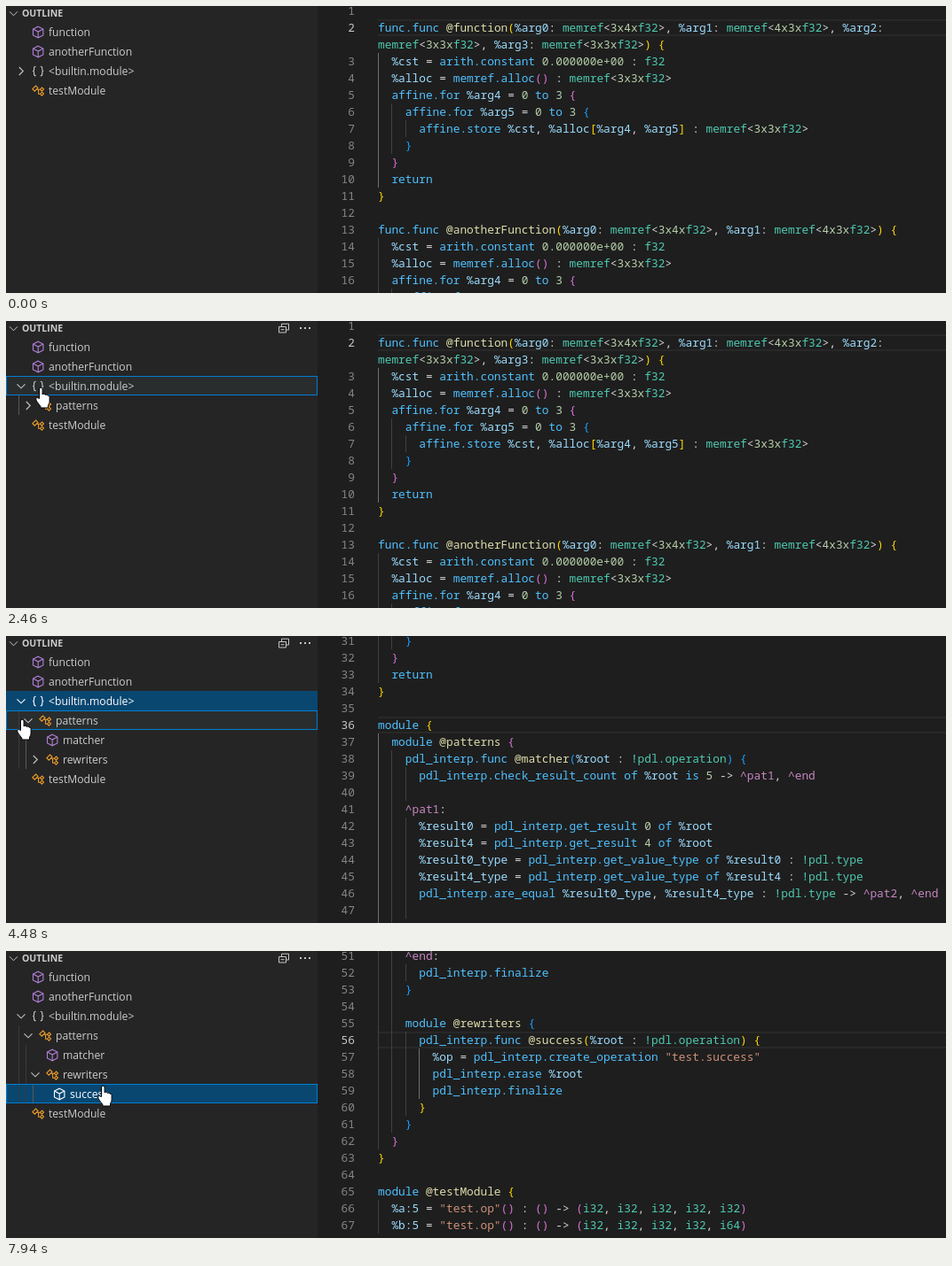
Recreate the animation shown at these times as an HTML page with a canvas. Size 1059 px wide and 324 px high, loop 8 s.

```html
<!DOCTYPE html>
<html lang="en">
<head>
<meta charset="utf-8">
<title>Outline view</title>
<style>
html, body { margin: 0; width: 100%; height: 100%; overflow: hidden; background: #1e1e1e; }
canvas { display: block; }
</style>
</head>
<body>
<canvas id="stage" width="1059" height="324"></canvas>
<script>
const ctx = document.getElementById('stage').getContext('2d');
const LOOP = 8000, TICK = 200 / 3, SIDEBAR = 351;
const LINE = 19, CHAR = 7.7, CODE_X = 419, ROW = 22, TREE_Y = 18;
const UI_FONT = '12.15px "Open Sans", sans-serif';
const CODE_FONT = '12.83px "Noto Sans Mono", monospace';

// Moments at which the interface changes, in ms
const AT = { press: 2060, openModule: 2130, selectModule: 2870, showModule: 2930,
  openPatterns: 4350, openRewriters: 5400, selectSuccess: 6750, showSuccess: 6810 };
const CLICKS = [[2060, 2200], [2800, 3000], [4220, 4420], [5280, 5480], [6610, 6940]];
const TOOLTIP = [6410, 6610];

// Pointer path: time, x, y
const PATH = [
  [590, 775, 312], [1130, 216, 178], [1330, 106, 118], [1600, 60, 84], [1930, 17, 72],
  [2200, 17, 73], [2460, 38, 75], [2730, 98, 74], [3610, 98, 74], [4080, 17, 92],
  [4220, 18, 94], [4720, 18, 94], [5010, 104, 110], [5140, 37, 136], [5610, 37, 136],
  [5800, 104, 152], [5870, 92, 161], [7900, 92, 161], [7935, 110, 152]
];

const VIEWS = [
  { first: 1, wrap: 2, active: 1, depth: 0, guide: [3, 10, 0], rows: `
func.func @function(%arg0: memref<3x4xf32>, %arg1: memref<4x3xf32>, %arg2:
memref<3x3xf32>, %arg3: memref<3x3xf32>) {
  %cst = arith.constant 0.000000e+00 : f32
  %alloc = memref.alloc() : memref<3x3xf32>
  affine.for %arg4 = 0 to 3 {
    affine.for %arg5 = 0 to 3 {
      affine.store %cst, %alloc[%arg4, %arg5] : memref<3x3xf32>
    }
  }
  return
}

func.func @anotherFunction(%arg0: memref<3x4xf32>, %arg1: memref<4x3xf32>) {
  %cst = arith.constant 0.000000e+00 : f32
  %alloc = memref.alloc() : memref<3x3xf32>
  affine.for %arg4 = 0 to 3 {
    affine.for %arg5 = 0 to 3 {` },
  { first: 31, active: 5, depth: 3, guide: [6, 17, 0], rows: `    }
  }
  return
}

module {
  module @patterns {
    pdl_interp.func @matcher(%root : !pdl.operation) {
      pdl_interp.check_result_count of %root is 5 -> ^pat1, ^end

    ^pat1:
      %result0 = pdl_interp.get_result 0 of %root
      %result4 = pdl_interp.get_result 4 of %root
      %result0_type = pdl_interp.get_value_type of %result0 : !pdl.type
      %result4_type = pdl_interp.get_value_type of %result4 : !pdl.type
      pdl_interp.are_equal %result0_type, %result4_type : !pdl.type -> ^pat2, ^end

    ^pat2:` },
  { first: 51, active: 5, depth: 3, guide: [6, 8, 3], rows: `    ^end:
      pdl_interp.finalize
    }

    module @rewriters {
      pdl_interp.func @success(%root : !pdl.operation) {
        %op = pdl_interp.create_operation "test.success"
        pdl_interp.erase %root
        pdl_interp.finalize
      }
    }
  }
}

module @testModule {
  %a:5 = "test.op"() : () -> (i32, i32, i32, i32, i32)
  %b:5 = "test.op"() : () -> (i32, i32, i32, i32, i64)
}` }
].map(view => ({ ...view, rows: view.rows.split('\n') }));

const TOKENS = [
  [/"[^"]*"/y, '#ce9178'],
  [/@\w+/y, '#dcdcaa'],
  [/%\w+(:\d+)?/y, '#9cdcfe'],
  [/\^\w+/y, '#c586c0'],
  [/!pdl\.\w+|memref(?=<)|[fi]\d\d\b/y, '#4ec9b0'],
  [/\d[\dx]*x(?=f32)|\d[\d.e+]*/y, '#b5cea8'],
  [/[a-z_]\w*(\.\w+)?/y, '#4fc1ff'],
  [/[()[\]{}]/y, null],
  [/[^\w@%^!"()[\]{}]+/y, '#d4d4d4']
];
const BRACKETS = ['#ffd700', '#da70d6', '#179fff'];

const ICONS = {
  cube: ['#b180d7', 'M0-6.3 5.7-3.4V3.4L0 6.3-5.7 3.4V-3.4ZM-5.7-3.4 0-.4 5.7-3.4M0-.4V6.3'],
  braces: ['#cccccc', 'M-2.6-5.3q-2 0-2 2v1.6q0 1.7-1.4 1.7 1.4 0 1.4 1.7v1.6q0 2 2 2M2.6-5.3q2 0 2 2v1.6q0 1.7 1.4 1.7-1.4 0-1.4 1.7v1.6q0 2-2 2'],
  module: ['#ee9d28', 'M-6.3-1.8-2.6-5.5-.2-3.1-3.9.6ZM-2-1.3H2.3M.4-1.3V3.8H2.3M2.3-1.3 4.4-3.4 6.3-1.5 4.2.6ZM2.3 3.8 4.4 1.7 6.3 3.6 4.2 5.7Z']
};
for (const icon of Object.values(ICONS)) icon[1] = new Path2D(icon[1]);
const CHEVRON_DOWN = new Path2D('M-4.5-2.2 0 2.3 4.5-2.2');
const CHEVRON_RIGHT = new Path2D('M-2.2-4.5 2.3 0-2.2 4.5');
const COLLAPSE_ALL = new Path2D('M-5.5-1.5h8v6.5h-8ZM-2.5-1.5V-4.8H5.5V2H2.5M-3.5 1.7h4');
const ARROW = new Path2D('M.5.5V16.5L4.2 13 6.8 18.6 9.2 17.5 6.7 12H11.8Z');
const HAND = new Path2D('M-2 12.5V2a1.8 1.8 0 0 1 3.6 0V8c.5-1.2 3-.8 3.2.6.6-1 2.6-.6 2.8.8.8-.6 2 0 2 1.4V16c0 2-1.4 3-1.6 5V23H-.6V21.5C-2 19-4 17.5-5.4 14.5c-1-2.5 1-3.8 2.2-2.4Z');
const IBEAM = new Path2D('M-3-8H-1L0-7 1-8H3M0-7V7M-3 8H-1L0 7 1 8H3');

function box(x, y, w, h, color) {
  ctx.fillStyle = color;
  ctx.fillRect(x, y, w, h);
}

function outline(x, y, w, h, color) {
  ctx.strokeStyle = color;
  ctx.lineWidth = 1;
  ctx.strokeRect(x + .5, y + .5, w - 1, h - 1);
}

function text(string, x, y, color, font, align = 'left') {
  ctx.font = font;
  ctx.textAlign = align;
  ctx.fillStyle = color;
  ctx.fillText(string, x, y);
}

function shape(path, x, y, stroke, fill, width = 1) {
  ctx.save();
  ctx.translate(x, y);
  ctx.lineWidth = width;
  if (fill) { ctx.fillStyle = fill; ctx.fill(path); }
  ctx.strokeStyle = stroke;
  ctx.stroke(path);
  ctx.restore();
}

const within = (t, [from, to]) => t >= from && t < to;

function pointerAt(t) {
  if (t < PATH[0][0]) return null;
  const time = Math.floor((t + 12) / TICK) * TICK;
  const next = PATH.findIndex(key => key[0] > time);
  if (next < 0) return { x: PATH.at(-1)[1], y: PATH.at(-1)[2] };
  if (next === 0) return { x: PATH[0][1], y: PATH[0][2] };
  const [t0, x0, y0] = PATH[next - 1], [t1, x1, y1] = PATH[next];
  const k = (time - t0) / (t1 - t0);
  return { x: Math.round(x0 + (x1 - x0) * k), y: Math.round(y0 + (y1 - y0) * k) };
}

// Blank lines continue the guides of their neighbours
function guideCount(rows, i) {
  const level = row => row ? row.search(/\S/) / 2 : 0;
  if (rows[i]) return level(rows[i]);
  const above = level(rows[i - 1]), below = level(rows[i + 1]);
  return above === below ? above : 1 + Math.min(above, below);
}

function drawCode(row, y, depth) {
  let column = 0;
  while (column < row.length) {
    let word, color;
    for (const [pattern, tint] of TOKENS) {
      pattern.lastIndex = column;
      const match = pattern.exec(row);
      if (match) { word = match[0]; color = tint; break; }
    }
    if (!color) color = BRACKETS[('([{'.includes(word) ? depth++ : --depth) % 3];
    text(word, CODE_X + column * CHAR, y, color, CODE_FONT);
    column += word.length;
  }
  return depth;
}

function drawEditor({ first, wrap, active, depth, guide, rows }) {
  box(SIDEBAR, 0, 1059 - SIDEBAR, 324, '#1e1e1e');
  rows.forEach((row, i) => {
    const top = i * LINE - 4;
    if (i === active) {
      box(CODE_X, top, 640, 2, '#282828');
      box(CODE_X, top + LINE - 2, 640, 2, '#282828');
    }
    for (let level = 0; level < guideCount(rows, i); level++) {
      const lit = level === guide[2] && i >= guide[0] && i <= guide[1];
      box(Math.round(CODE_X + level * 2 * CHAR), top, 1, LINE, lit ? '#707070' : '#404040');
    }
    if (i !== wrap) {
      text(first + i - (i > wrap ? 1 : 0), 393, top + 14, i === active ? '#c6c6c6' : '#858585', CODE_FONT, 'right');
    }
    depth = drawCode(row, top + 14, depth);
  });
}

function treeAt(t) {
  const row = (label, depth, icon, open) => ({ label, depth, icon, open });
  const rows = [row('function', 0, 'cube'), row('anotherFunction', 0, 'cube'),
    row('<builtin.module>', 0, 'braces', t >= AT.openModule)];
  if (t >= AT.openModule) rows.push(row('patterns', 1, 'module', t >= AT.openPatterns));
  if (t >= AT.openPatterns) rows.push(row('matcher', 2, 'cube'), row('rewriters', 2, 'module', t >= AT.openRewriters));
  if (t >= AT.openRewriters) rows.push(row('success', 3, 'cube'));
  rows.push(row('testModule', 0, 'module'));
  return rows;
}

function focusAt(t) {
  if (t < AT.openModule) return '';
  if (t < AT.openPatterns) return '<builtin.module>';
  if (t < AT.openRewriters) return 'patterns';
  return t < AT.selectSuccess ? 'rewriters' : 'success';
}

function drawSidebar(t, pointer) {
  box(0, 0, SIDEBAR, 324, '#252526');
  shape(CHEVRON_DOWN, 8.5, 8.5, '#c5c5c5');
  text('OUTLINE', 18, 12, '#cccccc', 'bold 10.5px "Open Sans", sans-serif');
  const hovering = pointer && pointer.x < SIDEBAR;
  if (hovering) {
    shape(COLLAPSE_ALL, 313, 8, '#c5c5c5');
    for (const x of [331, 336, 341]) box(x, 7, 2, 2, '#c5c5c5');
  }

  const rows = treeAt(t), focus = focusAt(t);
  const selected = t < AT.selectModule ? '' : t < AT.selectSuccess ? '<builtin.module>' : 'success';
  const focused = rows.find(row => row.label === focus);
  const litGuide = focused ? focused.depth - (focused.open === undefined ? 1 : 0) : -1;

  rows.forEach(({ label, depth, icon, open }, i) => {
    const top = TREE_Y + i * ROW, middle = top + 11, indent = depth * 8;
    const isSelected = label === selected;
    const isHovered = hovering && Math.floor((pointer.y - TREE_Y) / ROW) === i;
    if (isSelected) box(0, top, SIDEBAR, ROW, '#094771');
    else if (isHovered) box(0, top, SIDEBAR, ROW, '#2a2d2e');
    for (let level = 0; level < depth; level++) {
      box(14 + level * 8, top, 1, ROW, level === litGuide ? '#585858' : '#3a3a3a');
    }
    if (label === focus) outline(0, top, SIDEBAR, ROW, '#007fd4');
    if (open !== undefined) {
      shape(open ? CHEVRON_DOWN : CHEVRON_RIGHT, 17 + indent, middle + .5, isSelected ? '#ffffff' : '#c5c5c5', null, 1.1);
    }
    const [color, path] = ICONS[icon];
    shape(path, 36.2 + indent, middle + .5, isSelected ? '#ffffff' : color, null, 1.1);
    text(label, 48 + indent, top + 16, isSelected ? '#ffffff' : '#cccccc', UI_FONT);
  });
  if (within(t, [AT.press, AT.openModule])) outline(0, TREE_Y, SIDEBAR, 324 - TREE_Y, '#007fd4');
}

function drawTooltip() {
  box(102, 176, 110, 25, '#202124');
  outline(102, 176, 110, 25, '#5a5b5d');
  text('success (function)', 110, 193, '#e0e0e0', '11.2px "Open Sans", sans-serif');
}

function drawPointer(t, { x, y }) {
  if (CLICKS.some(click => within(t, click))) {
    ctx.fillStyle = 'rgba(255, 230, 0, .6)';
    ctx.beginPath();
    ctx.arc(x + .5, y + .5, 12.5, 0, 7);
    ctx.fill();
  }
  const treeBottom = TREE_Y + treeAt(t).length * ROW;
  if (x > SIDEBAR) shape(IBEAM, x + .5, y + .5, '#ffffff');
  else if (y < treeBottom) shape(HAND, x + .5, y, '#000000', '#ffffff');
  else shape(ARROW, x - .5, y - .5, '#000000', '#ffffff');
}

function draw() {
  const t = performance.now() % LOOP;
  const pointer = pointerAt(t);
  drawEditor(VIEWS[t < AT.showModule ? 0 : t < AT.showSuccess ? 1 : 2]);
  drawSidebar(t, pointer);
  if (within(t, TOOLTIP)) drawTooltip();
  if (pointer) drawPointer(t, pointer);
  requestAnimationFrame(draw);
}
draw();
</script>
</body>
</html>
```
